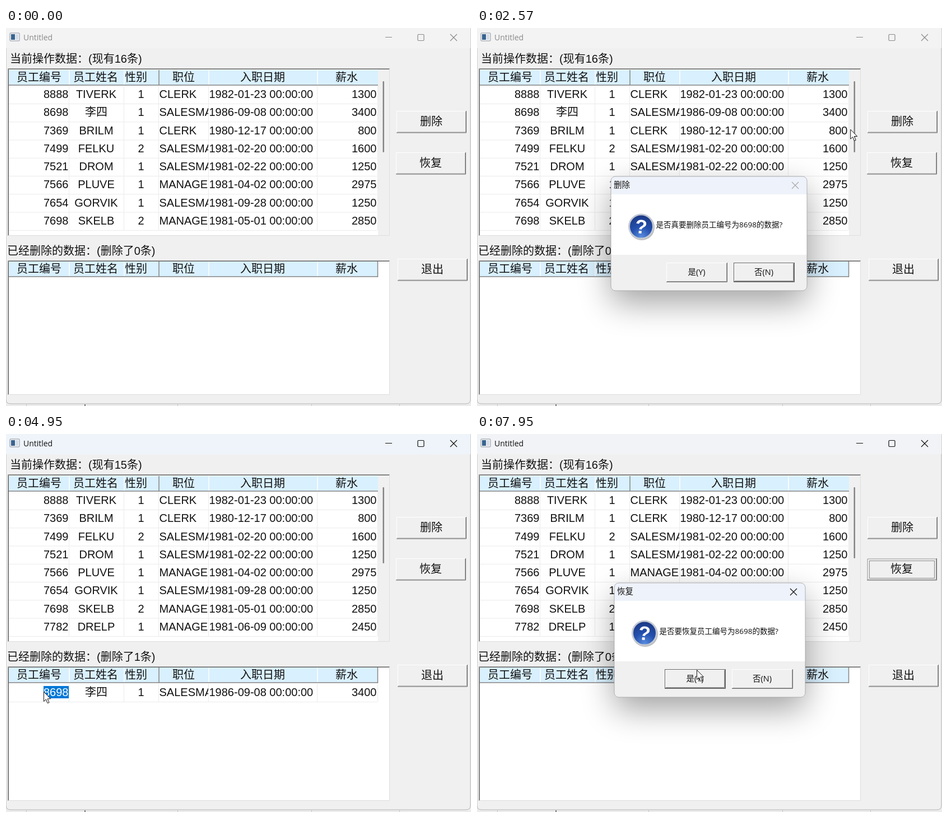
These frames come from a looping animation (830 by 675 pixels, 8 s). An HTML page:

```html
<!DOCTYPE html>
<html lang="zh-CN">
<head>
<meta charset="utf-8">
<title>Untitled</title>
<style>
  html, body { margin: 0; width: 100%; height: 100%; overflow: hidden; background: #fff; }
  svg { display: block; width: 830px; height: 675px; }
  text { font: 300 20px "Liberation Sans", "Noto Sans CJK SC", "Noto Sans CJK", sans-serif; fill: #111; white-space: pre; }
  .ui { font: 400 14.5px "Open Sans", "Noto Sans CJK SC", "Noto Sans CJK", sans-serif; }
  .message { font-size: 13.5px; font-weight: 500; }
  .line { fill: none; stroke: currentColor; }
</style>
</head>
<body>
<svg id="stage" viewBox="0 0 830 675"></svg>
<script>
const LOOP = 8000;
const ROW = 32.27;
const EDGES = [5, 113, 211, 273, 362, 556, 664];
const HEADS = [['员工编号', 59], ['员工姓名', 160], ['性别', 232], ['职位', 317], ['入职日期', 458], ['薪水', 608]];
const STAFF = [
  '8888 TIVERK 1 CLERK 1982-01-23 1300',
  '8698 李四 1 SALESMAN 1986-09-08 3400',
  '7369 BRILM 1 CLERK 1980-12-17 800',
  '7499 FELKU 2 SALESMAN 1981-02-20 1600',
  '7521 DROM 1 SALESMAN 1981-02-22 1250',
  '7566 PLUVE 1 MANAGER 1981-04-02 2975',
  '7654 GORVIK 1 SALESMAN 1981-09-28 1250',
  '7698 SKELB 2 MANAGER 1981-05-01 2850',
  '7782 DRELP 1 MANAGER 1981-06-09 2450'
].map(s => s.split(' '));

// Moments of the interaction, in ms
const T = {
  activate: 1000, pick: 1050, pressDelete: 2150, ask: 2430, yes: 3430, deleted: 3570,
  pickDeleted: 4740, hoverBar: 5860, pressRestore: 6700, leaveBar: 6900,
  askRestore: 6950, restored: 7890
};

const smooth = k => k * k * (3 - 2 * k);
const easeOut = k => k * (2 - k);
const linear = k => k;
const PATH = [
  [90, 600, 648], [820, 147, 184], [1050, 115.5, 153], [1450, 115.5, 153],
  [2050, 720, 165], [2500, 720, 164], [2570, 667, 180, linear],
  [3270, 401, 430, easeOut], [3800, 401, 430], [4740, 53, 482],
  [4810, 52, 482], [4940, 67, 460], [5020, 67, 460], [5540, 676, 349],
  [5790, 676, 349], [6570, 727, 246], [7020, 727, 246], [7680, 392, 421]
];

const rect = (x, y, w, h, fill, more = '') =>
  `<rect x="${x}" y="${y}" width="${w}" height="${h}" fill="${fill}" ${more}/>`;
const line = (d, color, width = 1, more = '') =>
  `<path class="line" d="${d}" color="${color}" stroke-width="${width}" ${more}/>`;
const text = (s, x, y, anchor = 'start', more = '') =>
  `<text x="${x}" y="${y}" text-anchor="${anchor}" ${more}>${s}</text>`;
const group = (id, body) => `<g id="${id}">${body}</g>`;

function bevel(x, y, w, h) {
  return rect(x, y, w, h, '#f0f0f0') +
    line(`M${x + .5} ${y + h}V${y + .5}H${x + w}`, '#fff') +
    line(`M${x + 1} ${y + h - 1.5}H${x + w - 1.5}V${y + 1}`, '#a0a0a0') +
    line(`M${x} ${y + h - .5}H${x + w - .5}V${y}`, '#696969');
}

function button(id, x, y, label) {
  return bevel(x, y, 125, 39.5) + text(label, x + 62, y + 26, 'middle') +
    group(id, line(`M${x + 1} ${y + 39}V${y + 1}H${x + 124}`, '#8c8c8c') +
      rect(x + 4.5, y + 4.5, 116, 31, 'none', 'stroke="#222" stroke-dasharray="1 1"'));
}

function sunken(y, h) {
  return rect(3, y, 682, h, '#fff') +
    line(`M3.5 ${y + h}V${y + .5}H685`, '#a0a0a0') +
    line(`M4.5 ${y + h - 1}V${y + 1.5}H684`, '#696969') +
    line(`M4 ${y + h - .5}H684.5V${y + 1}`, '#dedede');
}

function header(y) {
  let s = rect(5, y, 659, 27, '#d9f0fe');
  for (const x of EDGES.slice(1, 6)) s += line(`M${x} ${y}v27`, x === 273 ? '#858585' : '#fff', 1.5);
  s += line(`M5 ${y + 27}H664`, '#858585', 1.5);
  return s + HEADS.map(([h, x]) => text(h, x, y + 20, 'middle')).join('');
}

function row([no, name, sex, job, date, pay], y) {
  let s = line(`M5 ${y + 10.5}H662.5`, '#ebebeb');
  for (const x of EDGES.slice(1)) s += line(`M${x - .5} ${y - 22}v32`, '#ebebeb');
  return s + text(no, 111.5, y, 'end') + text(name, 161, y, 'middle') + text(sex, 241, y, 'middle') +
    text(job, 273.5, y, 'start', 'clip-path="url(#jobClip)"') +
    text(date + ' 00:00:00', 362.5, y) + text(pay, 661.5, y, 'end');
}

const rows = list => list.slice(0, 8).map((r, i) => row(r, 125 + i * ROW)).join('');

const selected = (s, x, y, w, anchor, tx) =>
  rect(x, y, w, 22, '#0078d7') + text(s, tx, y + 18, anchor, 'style="fill:#fff"');

function dialog(id, x, y, w, title, message) {
  const r = x + w, h = 204, cx = x + 54, cy = y + 89.5;
  const choice = (key, bx, label) => bevel(bx, y + 154, 109, 35) +
    text(label, bx + 54, y + 176, 'middle', 'class="ui"') +
    group(id + key, bevel(bx + 1, y + 155, 107, 33) +
      rect(bx + .5, y + 154.5, 108, 34, 'none', 'stroke="#646464"') +
      text(label, bx + 54, y + 176, 'middle', 'class="ui"'));
  return group(id,
    rect(x, y + 22, w, h, '#000', 'rx="10" opacity=".36" filter="url(#blur)"') +
    rect(x, y, w, h, '#fff', 'rx="8"') +
    `<path d="M${x} ${y + 32}v-24q0-8 8-8H${r - 8}q8 0 8 8v24z" fill="#eef2fa"/>` +
    `<path d="M${x} ${y + 140}H${r}v${h - 148}q0 8-8 8H${x + 8}q-8 0-8-8z" fill="#f0f0f0"/>` +
    rect(x, y, w, h, 'none', 'rx="8" stroke="#999" stroke-opacity=".7"') +
    text(title, x + 5, y + 20, 'start', 'class="ui"') +
    group(id + 'X', line(`M${r - 27} ${y + 10}l12 12m0-12l-12 12`, 'currentColor', 1.2)) +
    `<circle cx="${cx + 1}" cy="${cy + 1.5}" r="23" fill="#777" opacity=".5"/>` +
    `<circle cx="${cx}" cy="${cy}" r="21.5" fill="url(#ball)" stroke="#c3c8d2" stroke-width="3"/>` +
    text('?', cx, cy + 12.5, 'middle', `transform="rotate(6 ${cx} ${cy})" style="font-size:35px;font-weight:700;fill:#fff"`) +
    text(message, x + 80.5, y + 91, 'start', 'class="ui message"') +
    choice('Yes', r - 251, '是(Y)') + choice('No', r - 131, '否(N)'));
}

const stage = document.getElementById('stage');
stage.innerHTML = `
  <defs>
    <clipPath id="jobClip"><path d="M273 0H361V675H273z"/></clipPath>
    <filter id="blur" x="-40%" y="-60%" width="180%" height="220%"><feGaussianBlur stdDeviation="29"/></filter>
    <radialGradient id="ball" cx=".5" cy=".95" r=".9">
      <stop stop-color="#5b8fe0"/><stop offset=".5" stop-color="#2450ae"/><stop offset="1" stop-color="#1b3a86"/>
    </radialGradient>
  </defs>` +
  rect(0, 0, 830, 675, '#ececec') +
  line('M36.5 672v3M306.5 672v3M545.5 672v3M702.5 672v3', '#c4c4c4') + line('M141 672v3', '#777', 2) +
  '<path d="M0 0V663q0 8 8 8H821q8 0 8-8V0z" fill="#f0f0f0" stroke="#b4b4b4"/>' +
  `<rect id="bar" width="829" height="36"/>` +
  rect(7, 9, 17, 14, '#f5f7fa', 'rx="1" stroke="#8b929b"') + rect(9, 11, 7, 10, '#3a648f') + rect(17, 11, 5, 10, '#d5dde6') +
  group('caption', text('Untitled', 31, 22, 'start', 'class="ui" style="font-size:14px;fill:currentColor"') +
    line('M677 16.5h12M793 11l12 12m0-12l-12 12', 'currentColor', 1.2) +
    rect(735, 11.5, 11, 11, 'none', 'rx="1.5" stroke="currentColor" stroke-width="1.2"')) +
  text('', 7, 62, 'start', 'id="current"') + text('', 2, 404.5, 'start', 'id="removed"') +
  sunken(72, 299) + header(75) +
  group('before', rows(STAFF)) + group('after', rows(STAFF.filter((_, i) => i !== 1))) +
  group('pickName', selected('李四', 141, 139, 41, 'middle', 161)) +
  rect(664, 74, 20, 296, '#f0f0f0') + '<rect id="thumb" y="95" fill="#858585"/>' +
  group('arrows', '<path d="M668.5 89l5-8 5 8zM668.5 356h10l-5 8z" fill="#858585"/>') +
  sunken(415, 240) + header(417) + line('M663.5 417v28', '#858585', 1.5) +
  group('deletedRow', row(STAFF[1], 468)) +
  group('pickNo', selected('8698', 67, 450, 45, 'end', 111.5)) +
  button('focusDelete', 697, 148, '删除') + button('focusRestore', 696, 222, '恢复') + button('focusExit', 699, 412, '退出') +
  dialog('askDelete', 239, 265, 350, '删除', '是否真要删除员工编号为8698的数据?') +
  dialog('askRestore', 245, 266, 341, '恢复', '是否要恢复员工编号为8698的数据?') +
  group('cursor', '<path d="M.5.5V17.5l3.9-3.7 2.8 6.9 2.8-1.2-2.9-6.7h5.4z" fill="#fff" stroke="#111" stroke-linejoin="round"/>');

const el = {};
stage.querySelectorAll('[id]').forEach(n => el[n.id] = n);
const show = (id, on) => el[id].setAttribute('visibility', on ? 'inherit' : 'hidden');
const clamp = k => Math.max(0, Math.min(1, k));
const mix = (a, b, k) => `rgb(${a.map((v, i) => Math.round(v + (b[i] - v) * k))})`;

function pointer(t) {
  const i = PATH.findIndex(p => p[0] > t);
  if (i < 0) return PATH[PATH.length - 1].slice(1, 3);
  const [t0, x0, y0] = PATH[Math.max(0, i - 1)];
  const [t1, x1, y1, ease = smooth] = PATH[i];
  const k = t1 > t0 ? ease(clamp((t - t0) / (t1 - t0))) : 0;
  return [x0 + (x1 - x0) * k, y0 + (y1 - y0) * k];
}

function render(t) {
  const within = (a, b) => t >= a && t < b;
  const ramp = start => clamp((t - start) / 140);
  const isDeleted = within(T.deleted, T.restored);
  const wide = within(T.hoverBar, T.leaveBar);
  const active = within(T.activate, T.ask) || within(T.deleted, T.askRestore) || t >= T.restored;
  const glow = ramp(T.activate) - ramp(T.ask) + ramp(T.deleted) - ramp(T.askRestore) + ramp(T.restored);

  el.bar.setAttribute('fill', mix([243, 243, 243], [238, 244, 250], glow));
  el.caption.setAttribute('color', active ? '#111' : '#8a8a8a');
  el.current.textContent = `当前操作数据：(现有${isDeleted ? 15 : 16}条)`;
  el.removed.textContent = `已经删除的数据：(删除了${isDeleted ? 1 : 0}条)`;

  show('before', t < T.deleted);
  show('after', t >= T.deleted);
  show('deletedRow', isDeleted);
  show('pickName', within(T.pick, T.pressDelete));
  show('pickNo', within(T.pickDeleted, T.pressRestore));
  show('focusDelete', within(T.pressDelete, T.ask) || within(T.deleted, T.pickDeleted));
  show('focusRestore', within(T.pressRestore, T.askRestore) || t >= T.restored);
  show('focusExit', false);

  show('arrows', wide);
  const thumb = { x: wide ? 669.5 : 672.5, width: wide ? 8.5 : 2.5, rx: wide ? 4 : 1.2, height: isDeleted ? 136 : 127 };
  for (const key in thumb) el.thumb.setAttribute(key, thumb[key]);

  show('askDelete', within(T.ask, T.deleted));
  show('askDeleteYes', t >= T.yes);
  show('askDeleteNo', t < T.yes);
  // The default frame must stay hidden together with its dialog
  if (!within(T.ask, T.deleted)) ['askDeleteYes', 'askDeleteNo'].forEach(id => show(id, false));
  el.askDeleteX.setAttribute('color', t < 2620 ? '#aaa' : '#111');
  el.askDelete.setAttribute('opacity', clamp((t - T.ask + 40) / 120));
  show('askRestore', t >= T.askRestore);
  show('askRestoreNo', false);
  el.askRestoreX.setAttribute('color', t < T.askRestore + 190 ? '#aaa' : '#111');
  el.askRestore.setAttribute('opacity', clamp((t - T.askRestore + 40) / 120));

  show('cursor', t >= PATH[0][0]);
  el.cursor.setAttribute('transform', `translate(${pointer(t)})`);
}

const start = performance.now();
function tick() {
  render((performance.now() - start) % LOOP);
  requestAnimationFrame(tick);
}
tick();
</script>
</body>
</html>
```
